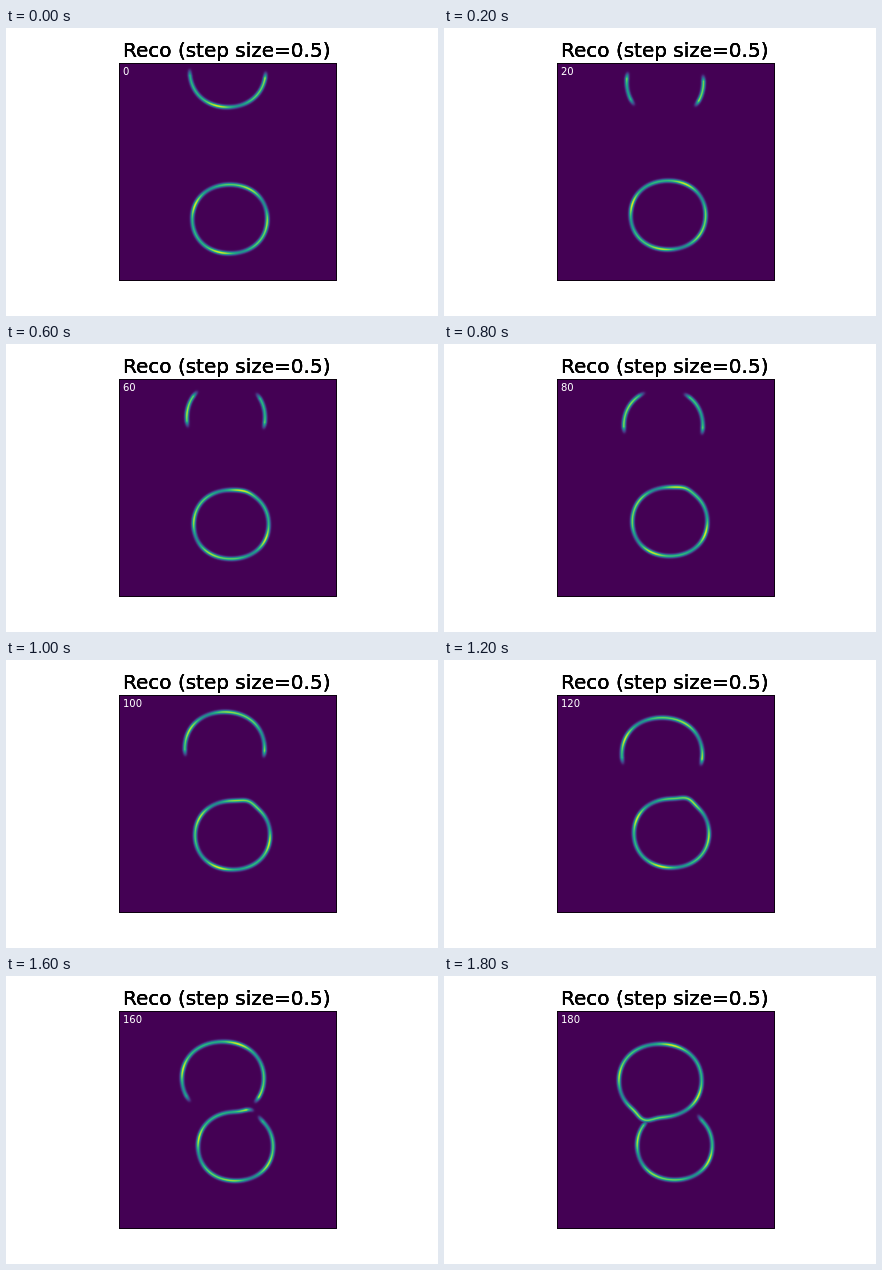
Write an HTML page with a canvas that moves like this. It is 432 px wide and 288 px high and loops after 2000 ms.

```html
<!DOCTYPE html>
<html lang="en">
<head>
<meta charset="utf-8">
<title>Reco (step size=0.5)</title>
<style>
  html, body { margin: 0; width: 100%; height: 100%; overflow: hidden; background: #fff; }
  canvas, svg, div { position: absolute; left: 0; top: 0; }
  div { left: 117px; white-space: pre; font-family: "DejaVu Sans", sans-serif; }
  .title { top: 10px; font-size: 20px; line-height: 24px; color: #000; }
  #step { top: 38px; font-size: 10px; line-height: 11px; color: #fff; }
</style>
</head>
<body>
<canvas id="field" width="432" height="288"></canvas>
<svg width="432" height="288" viewBox="0 0 432 288">
  <rect x="113.5" y="35.5" width="217" height="217" fill="none" stroke="#000" stroke-width=".8"/>
</svg>
<div class="title">Reco (step size=0.5)</div>
<div id="step">0</div>
<script>
const LEFT = 113, TOP = 35, SIZE = 218, SIGMA = 1.3, REACH = 6;
const STEP_MS = 200, STEPS = 10, DEG = Math.PI / 180;
const ctx = document.getElementById('field').getContext('2d');
const label = document.getElementById('step');

// The title is overprinted, which gives it heavier edges.
const title = document.querySelector('.title');
for (let i = 0; i < 3; i++) {
  const copy = title.cloneNode(true);
  copy.setAttribute('aria-hidden', 'true');
  title.after(copy);
}

const viridis = ['440154', '482878', '3e4989', '31688e', '26828e',
  '1f9e89', '35b779', '6ece58', 'b5de2b', 'fde725']
  .map(h => [0, 2, 4].map(i => parseInt(h.slice(i, i + 2), 16)));

const mix = (a, b, t) => a + (b - a) * t;
const clamp = v => Math.max(0, Math.min(1, v));

function colour(v) {
  const p = Math.min(v, 0.999) * (viridis.length - 1), i = Math.floor(p);
  return viridis[i].map((c, n) => mix(c, viridis[i + 1][n], p - i));
}

// Angles are in degrees, clockwise from the right.
const apart = (a, b) => Math.abs((a - b + 540) % 360 - 180);

// 0 inside a gap, rising softly to 1 outside it.
const outside = (a, { at, half }) => half > 0 ? clamp((apart(a, at) - half) / 10) : 1;

const glow = (a, k) =>
  0.72 + 0.15 * Math.cos(4 * (a - 20) * DEG) + 0.08 * Math.cos(7 * a * DEG + k);

// An almost elliptic outline with one pointed tip and some gaps.
function ring(k, { cx, cy, rx, ry, tip, gaps }) {
  const pts = [];
  for (let a = 0; a < 360; a += 0.5) {
    const bulge = 1 + 0.02 * Math.sin(2 * a * DEG) ** 2;
    const bump = tip.size * Math.exp(-((apart(a, tip.at) / 13) ** 2));
    pts.push([
      cx + (rx * bulge + bump) * Math.cos(a * DEG),
      cy + (ry * bulge + bump) * Math.sin(a * DEG),
      gaps.reduce((v, g) => v * outside(a, g), glow(a, k))
    ]);
  }
  return pts;
}

// Sinks and slows; its top closes first, its bottom opens and closes again.
const upper = k => ring(k, {
  cx: 221.2 - 0.6 * k,
  cy: 42 + 12.1 * k - 0.578 * k * k,
  rx: 38 + 0.37 * k,
  ry: 36.6,
  tip: { at: 110, size: 0.55 * k },
  gaps: [
    { at: 272, half: 90 * Math.max(0, 1 - k / 5) ** 0.7 },
    { at: 91, half: k < 9 ? 78 * Math.sin(k * Math.PI / 9) ** 0.4 : 0 }
  ]
});

// Rises and slows; its tip reaches for the upper ring, then its top opens.
function lower(k) {
  const half = 5 * Math.max(0, k - 7) ** 3;
  return ring(k, {
    cx: 223.3 + 0.3 * k + 0.052 * k * k,
    cy: 190.5 - 4.1 * k + 0.19 * k * k,
    rx: 37.5,
    ry: 34.4,
    tip: { at: 293, size: 0.75 * Math.max(0, k - 2) },
    gaps: [{ at: 305 - half, half }]
  });
}

function paint(k) {
  const f = new Float32Array(SIZE * SIZE), img = ctx.createImageData(SIZE, SIZE);
  for (const [x, y, v] of [...upper(k), ...lower(k)]) {
    const px = x - LEFT, py = y - TOP, cx = Math.round(px), cy = Math.round(py);
    for (let j = Math.max(0, cy - REACH); j <= cy + REACH; j++) {
      for (let i = cx - REACH; i <= cx + REACH; i++) {
        const d = (i - px) ** 2 + (j - py) ** 2, n = j * SIZE + i;
        f[n] = Math.max(f[n], v * Math.exp(-d / (2 * SIGMA * SIGMA)));
      }
    }
  }
  f.forEach((v, n) => img.data.set([...colour(v), 255], n * 4));
  return img;
}

const images = Array.from({ length: STEPS }, (_, k) => paint(k));
let shown = -1;

function show(ms) {
  const k = Math.floor(ms / STEP_MS) % STEPS;
  if (k === shown) return;
  shown = k;
  ctx.putImageData(images[k], LEFT, TOP);
  label.textContent = k * 20;
}

let start = null;
function tick(now) {
  if (start === null) start = now;
  show(Math.max(0, now - start));
  requestAnimationFrame(tick);
}
show(0);
requestAnimationFrame(tick);
</script>
</body>
</html>
```
